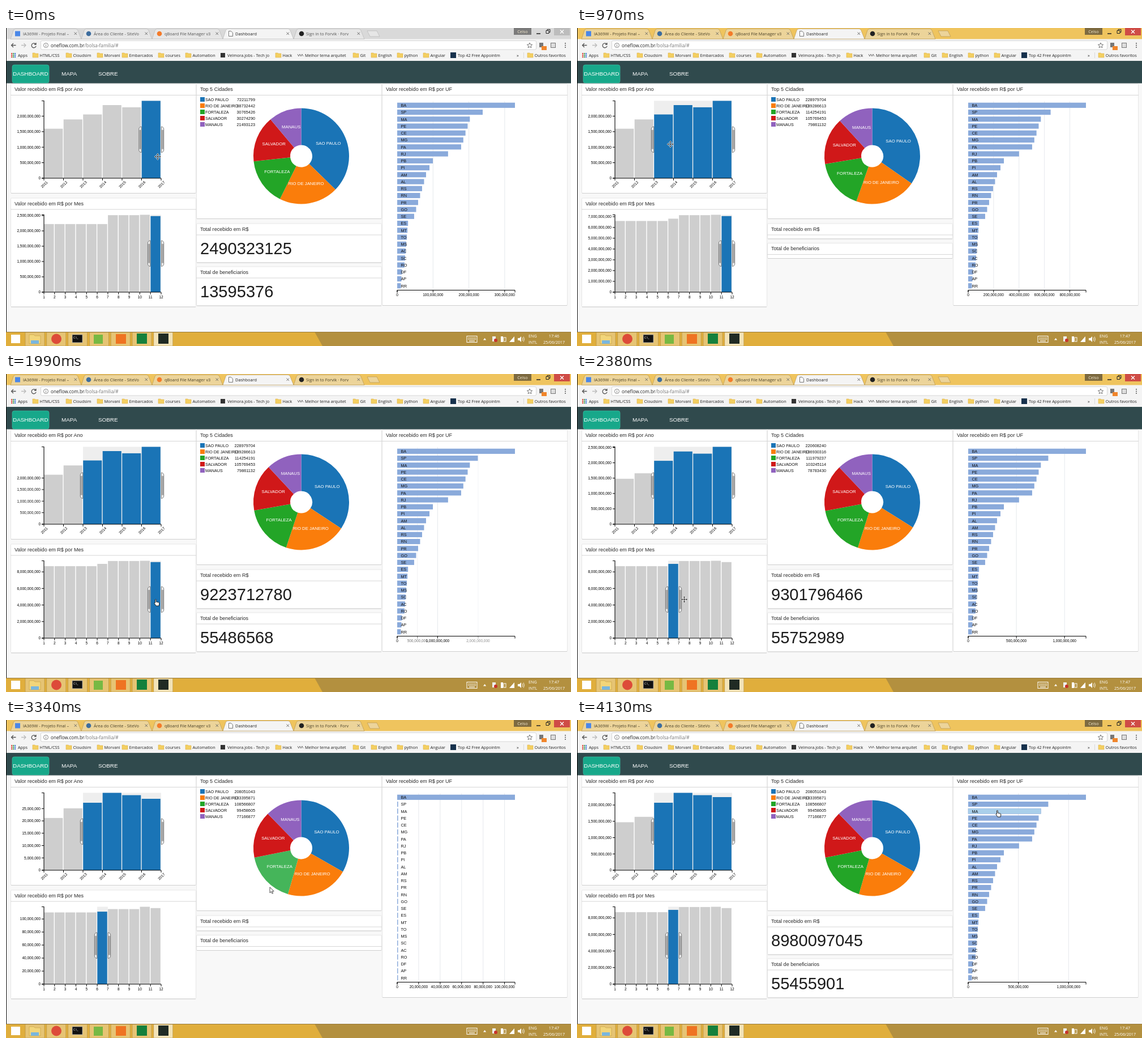
These frames come from a looping animation (998 by 561 pixels, 4160 ms). An HTML page:

```html
<!DOCTYPE html>
<html lang="pt-BR">
<head>
<meta charset="utf-8">
<title>Dashboard</title>
<style>
html, body { margin: 0; width: 100%; height: 100%; overflow: hidden; background: #f8f8f8; }
svg { display: block; width: 998px; height: 561px; }
text { font-family: "Liberation Sans", Arial, sans-serif; white-space: pre; }
.ui text { font-family: "Open Sans", "Noto Sans", sans-serif; }
</style>
</head>
<body>
<svg viewBox="0 0 998 561">
  <g id="frame" class="ui"></g>
  <g id="page"></g>
  <g id="live"></g>
</svg>
<script>
const LOOP = 4160, EASE_TIME = 300;
const BLUE = '#1a74b6';
const $ = id => document.getElementById(id);

// Drawing helpers
const rect = (x, y, w, h, fill, more = '') =>
  `<rect x="${x}" y="${y}" width="${w}" height="${h}" fill="${fill}" ${more}/>`;
const dot = (x, y, r, fill) => `<circle cx="${x}" cy="${y}" r="${r}" fill="${fill}"/>`;
const line = (d, stroke = '#000', width = 1, more = '') =>
  `<path d="${d}" fill="none" stroke="${stroke}" stroke-width="${width}" ${more}/>`;
const shape = (d, fill, more = '') => `<path d="${d}" fill="${fill}" ${more}/>`;
const text = (x, y, s, size, fill = '#222', more = '') =>
  `<text x="${x}" y="${y}" font-size="${size}" fill="${fill}" ${more}>${s}</text>`;
const MID = 'text-anchor="middle"', END = 'text-anchor="end"';
const folder = (x, y) =>
  shape(`M${x} ${y - 4}h4l1 1h5v7h-10z`, '#f3cf62', 'stroke="#d9ab3c" stroke-width=".5"');
const panel = (x, y, w, h, title) =>
  rect(x + .5, y + .5, w - 1, h - 1, '#fff', 'rx="1.5" stroke="#e6e6e6"') +
  line(`M${x} ${y + 20.5}h${w}`, '#d6d6d6') +
  line(`M${x + 1} ${y + h - .5}h${w - 2}`, '#cfcfcf') +
  text(x + 7, y + 13.4, title, 9.05, '#2b2b2b');

// Motion helpers
const mix = (a, b, p) => a + (b - a) * p;
const clamp = v => Math.max(0, Math.min(1, v));
const cubic = p => p < .5 ? 4 * p ** 3 : 1 - 4 * (1 - p) ** 3;
const indexAt = (list, t) => list.filter(row => row[0] <= t).length - 1;
const pick = (list, t) => list[indexAt(list, t)];

// Straight lines through key points [x, y, ...]
function along(points, x, col = 1) {
  const i = Math.max(0, indexAt(points, x)), a = points[i], b = points[i + 1];
  return b ? mix(a[col], b[col], clamp((x - a[0]) / (b[0] - a[0]))) : a[col];
}

function titleBar(focused) {
  const [bar, idle, edge, ink] = focused
    ? ['#efc45e', '#ecd49a', '#b08f4c', '#4a4028'] : ['#d9d9d9', '#e6e6e6', '#b0b0b0', '#555'];
  const tab = (x, title, icon, active) =>
    shape(`M${x} 19.5l5-15q1-3 4-3h106q3 0 4 3l6 15z`, active ? '#f4f4f4' : idle,
      `stroke="${edge}" stroke-width=".6"`) +
    icon + text(x + 22, 12.8, title, 7.4, active ? '#222' : ink) +
    line(`M${x + 112.5} 7.5l4.5 4.5m0-4.5l-4.5 4.5`, '#666', .9);
  return rect(1, 0, 997, 19.5, bar) +
    tab(508, 'Sign in to Forvik · Forv', dot(522, 10, 4.3, '#222')) +
    tab(258, 'qBoard File Manager v3', dot(271, 10, 4.3, '#f47b2a')) +
    tab(133, 'Área do Cliente - SiteVo', dot(146, 10, 4.3, '#3d6d9e')) +
    tab(8, 'IA369W - Projeto Final –', rect(16, 5.5, 9, 9, '#4a87e8')) +
    tab(383, 'Dashboard', shape('M393.5 5.5h4l3 3v6h-7z', '#fff', 'stroke="#555" stroke-width=".8"'), true) +
    shape('M638 5h17l5 10h-17z', idle, `stroke="${edge}" stroke-width=".6"`) +
    rect(897, 0, 31, 12, focused ? '#7d6a40' : '#7b7b7b') + text(912.5, 8.7, 'Celso', 7.4, '#f4ead0', MID) +
    rect(968, 0, 28, 13, focused ? '#cf4c46' : '#bcbcbc') +
    line('M937 10h7', '#222', 1.5) + line('M954 4.5h5v5h-5zM956 4.5v-2h5v5h-2', '#222') +
    line('M979 3.500l6 6m0-6l-6 6', '#fff', 1.3);
}

function drawFrame() {
  // Toolbar
  let s = rect(0, 19, 998, 39, '#f4f4f4') +
    rect(61.5, 22.5, 875, 15.5, '#fff', 'rx="2" stroke="#c8c8c8" stroke-width=".7"') +
    line('M17.5 30.5h-8m3.5-3.5l-3.5 3.5l3.5 3.5', '#555', 1.3) +
    line('M27 30.5h8m-3.5-3.5l3.5 3.5l-3.5 3.5', '#bbb', 1.3) +
    line('M52.5 28.5a4 4 0 1 0 .6 3.3M53 26v3h-3', '#555', 1.3) +
    line('M66.5 30.5a4 4 0 1 0 8 0a4 4 0 1 0 -8 0M70.5 29.8v3M70.5 28v1', '#777', .9) +
    text(79, 33.6, 'oneflow.com.br<tspan fill="#777">/bolsa-familia/#</tspan>', 8.2) +
    shape('M925 26l1.3 3 3.3.3-2.5 2.2.8 3.3-2.9-1.7-2.9 1.7.8-3.3-2.5-2.2 3.3-.3z', 'none',
      'stroke="#555" stroke-width=".8"') +
    rect(942, 26, 7, 8, '#777') + rect(946, 32, 9, 7, '#f0852b') +
    rect(962.5, 26.5, 8, 8, '#ddd', 'stroke="#777"');
  for (let i = 0; i < 3; i++) s += dot(988, 27 + i * 3.5, 1, '#555');

  // Bookmarks
  for (let i = 0; i < 9; i++)
    s += rect(9 + i % 3 * 3, 44 + Math.floor(i / 3) * 3, 2.2, 2.2, ['#dd4b3e', '#4aa05a', '#4b80d8'][i % 3]);
  const mark = (x, label) => text(x, 51, label, 7.3);
  const folders = [[47, 'HTML/CSS'], [106, 'Cloudsim'], [161, 'Morvani'], [205, 'Embarcados'],
    [269, 'courses'], [317, 'Automation'], [476, 'Hack'], [613, 'Git'], [645, 'English'],
    [691, 'python'], [737, 'Angular'], [921, 'Outros favoritos']];
  s += mark(21, 'Apps') + folders.map(([x, label]) => folder(x, 48) + mark(x + 12.5, label)).join('') +
    rect(379, 44, 8, 8, '#333') + mark(391, 'Velmora.jobs - Tech jo') +
    line('M515 46l2 4 2-4 2 4 2-4 2 4', '#555', .8) + mark(528, 'Melhor tema arquitet') +
    rect(785, 43, 10, 10, '#17324d') + mark(798, 'Top 42 Free Appointm') +
    mark(902, '»') + line('M914.5 43v10', '#ccc', .7);

  // Taskbar
  s += rect(0, 536, 998, 25, '#b3903f') + shape('M0 536h545l14 25H0z', '#e0ae3c') +
    rect(0, 536, 998, 1, '#9a7b38');
  for (let i = 0; i < 7; i++)
    s += rect(34 + i * 37.8, 537, 34, 24, i < 6 ? '#e6c474' : '#f3e3b8', 'stroke="#b08d42" stroke-width=".6"');
  s += rect(9, 541, 16, 15, '#fff') +
    shape('M41 541h8l2 2h10v14h-20z', '#f2d57a', 'stroke="#c39b3b" stroke-width=".6"') +
    rect(44, 551, 14, 6, '#79b6de') + dot(89, 548.5, 9, '#dd4b39') +
    rect(117, 541, 18, 14, '#111', 'stroke="#bbb" stroke-width=".8"') +
    text(119, 548, 'C:\\_', 5, '#fff') +
    rect(155, 541, 16, 16, '#77b943') + rect(194, 540, 18, 17, '#ef7322') +
    rect(231, 539, 18, 18, '#15803c') + rect(269, 539, 18, 18, '#202b24');
  s += rect(814, 543.5, 18, 11, 'none', 'stroke="#fff"');
  for (let i = 0; i < 12; i++)
    s += rect(816.5 + i % 6 * 2.4, 546 + Math.floor(i / 6) * 2.6, 1.4, 1.4, '#fff');
  s += rect(818, 551.5, 10, 1.2, '#fff') + shape('M843 550.5l2.6-3.5 2.6 3.5z', '#fff') +
    rect(859, 544, 6, 9, '#eee') + dot(865, 551, 3, '#c8332b') +
    rect(874, 544, 4, 10, '#fff') + rect(879, 546, 4, 7, 'none', 'stroke="#fff"') +
    shape('M889 554h9v-10z', '#fff') + shape('M904 547h3l3-3v10l-3-3h-3z', '#fff') +
    line('M912 546q2 3 0 6M914 544.5q3 4.5 0 9', '#fff', .8) +
    text(923, 546, 'ENG', 7.2, '#fff') + text(923, 557, 'INTL', 7.2, '#fff') +
    text(968, 557, '25/06/2017', 7.2, '#fff', MID);
  $('frame').innerHTML = s;
}

function drawPage() {
  $('page').innerHTML = rect(0, 58, 998, 478, '#f8f8f8') + rect(0, 58, 998, 39.5, '#304a4d') +
    rect(11, 65, 65, 32, '#17a88a', 'rx="3.5" stroke="#3cbfa4" stroke-width=".7"') +
    text(43.3, 83.7, 'DASHBOARD', 9.9, '#fff', MID) + text(98, 83.7, 'MAPA', 9.9, '#fff') +
    text(163, 83.7, 'SOBRE', 9.9, '#fff') +
    panel(8, 98, 328, 194, 'Valor recebido em R$ por Ano') +
    panel(8, 299.5, 328, 193, 'Valor recebido em R$ por Mes') +
    panel(336, 98, 328, 239, 'Top 5 Cidades') +
    panel(664, 98, 328, 392, 'Valor recebido em R$ por UF') +
    rect(0, 0, 1, 536, '#111');
}

// Bar profiles, as shares of the chart size
const yearBars = (scale, lift, last) =>
  [.62 + lift, .69 + 2 * lift, .872, 1, .97].map(v => v * scale).concat(last);
const monthBars = (early, june, late) => Array.from({ length: 11 }, (_, i) =>
  i < 5 ? early : i === 5 ? june : i < 9 ? late : i === 9 ? 1 : .983);
const stateBars = second => Array.from({ length: 27 }, (_, i) =>
  along([[0, 1], [1, second], [2, .617], [6, .543], [7, .432], [8, .303], [10, .245], [16, .144],
    [17, .092], [23, .062], [24, .041], [26, .031]], i));
const cityOnly = Array.from({ length: 27 }, (_, i) => i ? .007 : 1);

const decYears = yearBars(.945, .057, 1), juneYears = yearBars(1, 0, .945);
const allMonths = monthBars(.93, .96, .997);

const oneYear = [72211799, 38732442, 30765426, 30274290, 21493123];
const december = [228979704, 139286613, 114254191, 105769453, 79861132];
const june = [208051043, 133395871, 108566807, 99458605, 77166877];
const between = (a, b, p) => a.map((v, i) => Math.round(mix(v, b[i], p)));
const times = n => december.map(v => Math.round(v * n));

// Transitions: start, value at full scale, bars
const years = [[0, 2.493e9, decYears], [1306, 7.48e9, decYears], [1500, 9.95e9, decYears],
  [1783, 2.493e9, decYears], [2083, 2.52e9, yearBars(.94, .005, 1)], [2400, 2.374e9, juneYears],
  [3060, 29e6, yearBars(1, .055, .923)], [3480, 2.374e9, juneYears]];
const months = [[0, 2.527e9, monthBars(.88, .88, .995)], [460, 4.8e9, monthBars(.9, .92, .995)],
  [660, 7.15e9, monthBars(.92, .95, .995)], [905, 9.34e9, allMonths],
  [3060, 109.4e6, monthBars(.927, .937, .97)], [3480, 9.34e9, allMonths]];
const states = [[0, 328.6e6, stateBars(.726)], [460, 62e7, stateBars(.71)], [660, 92.5e7, stateBars(.7)],
  [930, 1.253e9, stateBars(.69)], [1360, 5e9, stateBars(.685)], [1835, 1.253e9, stateBars(.685)],
  [2083, 1.222e9, stateBars(.68)], [2400, 1.173e9, stateBars(.68)], [3060, 108.6e6, cityOnly],
  [3480, 1.173e9, stateBars(.68)]];
const cities = [[0, 1, oneYear], [460, 1, between(oneYear, december, 1 / 3)],
  [660, 1, between(oneYear, december, 2 / 3)], [905, 1, december], [1220, 1, times(2)],
  [1306, 1, times(3)], [1500, 1, times(4)], [1783, 1, december],
  [2083, 1, between(june, december, .6)], [2400, 1, june]];

// Dragged brush edges, snapped to whole bars
const yearStart = t => Math.round(along([[350, 5], [1016, 2]], t));
const monthStart = t => Math.round(along([[1190, 10], [1385, 7], [1750, 7], [1880, 10], [2100, 10], [2370, 5]], t));

const totals = [[0, 2490323125, 13595376], [460], [1940, 9223712780, 55486568], [2100],
  [2360, 9301796466, 55752989], [2400], [2700, 8980097045, 55455901], [3060], [3780, 8980097045, 55455901]];
const pointer = [[0, 'move'], [1880, 'hand'], [2080, 'move'], [2450, 'arrow'], [2940, 'hand'],
  [3260, 'arrow'], [3440, 'hand'], [3580, 'arrow'], [4000, 'hand']];
const path = [[350, 268, 227], [950, 165, 205], [1080, 165, 205], [1190, 256, 392], [1390, 208, 389],
  [1750, 200, 392], [1990, 266, 403], [2080, 266, 403], [2380, 189, 398], [2950, 470, 264],
  [3120, 470, 264], [3340, 466, 295], [3560, 474, 272], [4130, 744, 165]];

// A new transition starts from wherever the last one has got to
function stateAt(list, t) {
  const i = indexAt(list, t), [start, to, goal] = list[i];
  if (!i) return { p: 1, from: to, to, max: to, goal, bars: goal };
  const before = stateAt(list.slice(0, i), start);
  const p = cubic(clamp((t - start) / EASE_TIME));
  return { p, from: before.to, to, goal, max: mix(before.max, to, p),
    bars: goal.map((v, k) => mix(before.bars[k], v, p)) };
}

function tickValues(max, count) {
  let step = 10 ** Math.floor(Math.log10(max / count));
  const err = count / max * step;
  step *= err <= .15 ? 10 : err <= .35 ? 5 : err <= .75 ? 2 : 1;
  return Array.from({ length: Math.floor(max / step) + 1 }, (_, i) => i * step);
}

// Old ticks fade out while new ones fade in
function fadingTicks(s, count) {
  const old = tickValues(s.from, count), next = tickValues(s.to, count);
  return [...new Set([...old, ...next])]
    .filter(v => v <= s.max * 1.03)
    .map(v => [v, (old.includes(v) ? 1 - s.p : 0) + (next.includes(v) ? s.p : 0)])
    .filter(([, o]) => o > .01);
}
const num = v => v.toLocaleString('en-US');

const LEFT = 67, WIDE = 207, TALL = 136.5, AXIS = 6.5;

function handle(x, top, dir) {
  const y = TALL / 3 / .73, e = dir > 0 ? 1 : 0;
  const d = `M${.5 * dir} ${y}A6 6 0 0 ${e} ${6.5 * dir} ${y + 6}V${2 * y - 6}A6 6 0 0 ${e} ${.5 * dir} ${2 * y}Z` +
    `M${2.5 * dir} ${y + 8}V${2 * y - 8}M${4.5 * dir} ${y + 8}V${2 * y - 8}`;
  return `<g transform="translate(${x} ${top}) scale(.73)">${shape(d, '#eee', 'stroke="#555"')}</g>`;
}

function columns(s, base, a, b, label) {
  const n = s.bars.length, step = WIDE / n, top = base - TALL;
  let out = rect(LEFT + a * step, top, (b - a) * step, TALL, '#eeeeee');
  s.bars.forEach((v, i) => {
    const h = v * TALL;
    out += rect(LEFT + .2 + i * step, base - h, step - 1.4, h, i >= a && i < b ? BLUE : '#cecece');
  });
  out += handle(LEFT + a * step, top, -1) + handle(LEFT + b * step, top, 1);
  out += line(`M${LEFT - 4} ${top}h4V${base}h-4M${LEFT} ${base}h${WIDE}`, '#000', 1.1);
  for (const [v, o] of fadingTicks(s, 6)) {
    const y = base - v / s.max * TALL;
    out += `<g opacity="${o}">${line(`M${LEFT - 4} ${y}h4`)}${text(61, y + 2.4, num(v), AXIS, '#000', END)}</g>`;
  }
  for (let i = 0; i <= n; i++) {
    const x = LEFT + i * step;
    out += line(`M${x} ${base}v4`) + label(x, i);
  }
  return out;
}
const yearLabel = (x, i) =>
  text(0, 2.3, 2011 + i, AXIS, '#000', `${MID} transform="translate(${x + .5} 276) rotate(-45)"`);
const monthLabel = (x, i) => text(x, 477, i + 1, AXIS, '#000', MID);

const cityNames = ['SAO PAULO', 'RIO DE JANEIRO', 'FORTALEZA', 'SALVADOR', 'MANAUS'];
const cityColors = [BLUE, '#fa7d0b', '#23a527', '#d01819', '#9062be'];

function pie(s, hover) {
  const cx = 521.5, cy = 226, sum = s.bars.reduce((a, b) => a + b);
  const at = (r, a) => `${cx + r * Math.sin(a)} ${cy - r * Math.cos(a)}`;
  let slices = '', labels = '', a = 0;
  s.bars.forEach((v, i) => {
    const b = a + v / sum * 2 * Math.PI, m = (a + b) / 2;
    slices += shape(`M${at(84.5, a)}A84.5 84.5 0 0 1 ${at(84.5, b)}L${at(19.5, b)}A19.5 19.5 0 0 0 ${at(19.5, a)}Z`,
      hover === i ? '#45b55a' : cityColors[i]);
    labels += text(cx + 52 * Math.sin(m), cy - 52 * Math.cos(m), cityNames[i], 7.8, '#fff', MID);
    const y = 122 + i * 11;
    labels += rect(343, y, 8, 8, cityColors[i]) + text(352, y + 6.8, cityNames[i], 7.2, '#111') +
      text(440, y + 6.8, s.goal[i], 7.3, '#111', END);
    a = b;
  });
  return slices + labels;
}

function stateCodes(t) {
  const pair = (flip, a, b) => flip ? [b, a] : [a, b];
  return ['BA', 'SP', 'MA', 'PE', 'CE', 'MG', 'PA', 'RJ', 'PB', 'PI', ...pair(t > 2200, 'AM', 'AL'), 'RS',
    ...pair(t > 2400, 'RN', 'PR'), 'GO', 'SE', 'ES', 'MT', 'TO', 'MS', ...pair(t > 660, 'AC', 'SC'),
    'RO', 'DF', 'AP', 'RR'];
}

function rows(s, t) {
  const x0 = 691, wide = 208, base = 462.5, hover = t > 4020 ? 2 : -1;
  let grid = '', axis = line(`M${x0} ${base + 4}v-4h${wide}v4`);
  for (const [v, o] of fadingTicks(s, 4)) {
    const x = x0 + v / s.max * wide;
    if (v) grid += line(`M${x} 129V${base}`, '#dfe3e8', .8, `opacity="${o}"`);
    axis += `<g opacity="${o}">${line(`M${x} ${base}v4`)}${text(x, 473, num(v), AXIS, '#000', MID)}</g>`;
  }
  const codes = stateCodes(t);
  const bars = s.bars.map((v, i) => {
    const y = 131.7 + i * 12.25;
    return rect(x0, y, v * wide, 9.2, i === hover ? '#a9cfea' : '#8aaadb',
      i === hover ? 'stroke="#8aaadb" stroke-width=".6"' : '') + text(697.5, y + 7.3, codes[i], 7.3, '#111');
  });
  return grid + bars.join('') + axis;
}

function counters([, money, people]) {
  const low = money ? 420.5 : 379, size = money ? 70 : 28;
  const big = (y, v) => v ? text(343, y, v, 29.1, '#1c1c1c') : '';
  return panel(336, 344.5, 328, size, 'Total recebido em R$') +
    panel(336, low, 328, size, 'Total de beneficiarios') + big(398.7, money) + big(475.4, people);
}

const icons = {
  arrow: shape('M0 0v10l2.4-2.2 1.7 3.7 1.6-.8-1.7-3.5h3.2z', '#fff', 'stroke="#222" stroke-width=".8"'),
  hand: shape('M-2.5-5q1-1 1.8 0v4l4 .8q1.7.5 1.5 2.2l-.8 4h-5l-3-4.5q0-1.5 1.5-.7z', '#fff',
    'stroke="#111" stroke-width=".9"'),
  move: shape('M0-6l2.2 2.7h-1.4v2.5h2.5v-1.4l2.7 2.2-2.7 2.2v-1.4h-2.5v2.5h1.4l-2.2 2.7-2.2-2.7h1.4v-2.5h-2.5v1.4l-2.7-2.2 2.7-2.2v1.4h2.5v-2.5h-1.4z',
    '#222', 'stroke="#fff" stroke-width=".7"')
};
const cursor = t =>
  `<g transform="translate(${along(path, t)} ${along(path, t, 2)})">${icons[pick(pointer, t)[1]]}</g>`;

function draw(t) {
  const first = monthStart(t);
  $('live').innerHTML =
    `<g class="ui">${titleBar(t >= 30)}${text(968, 546, t < 600 ? '17:46' : '17:47', 7.2, '#fff', MID)}</g>` +
    columns(stateAt(years, t), 265, yearStart(t), 6, yearLabel) +
    columns(stateAt(months, t), 466, first, t < 2100 ? 11 : first + 1, monthLabel) +
    pie(stateAt(cities, t), t > 2930 && t < 3580 ? 2 : -1) +
    counters(pick(totals, t)) + rows(stateAt(states, t), t) + cursor(t);
}

drawFrame();
drawPage();
function tick() {
  draw(performance.now() % LOOP);
  requestAnimationFrame(tick);
}
tick();
</script>
</body>
</html>
```
